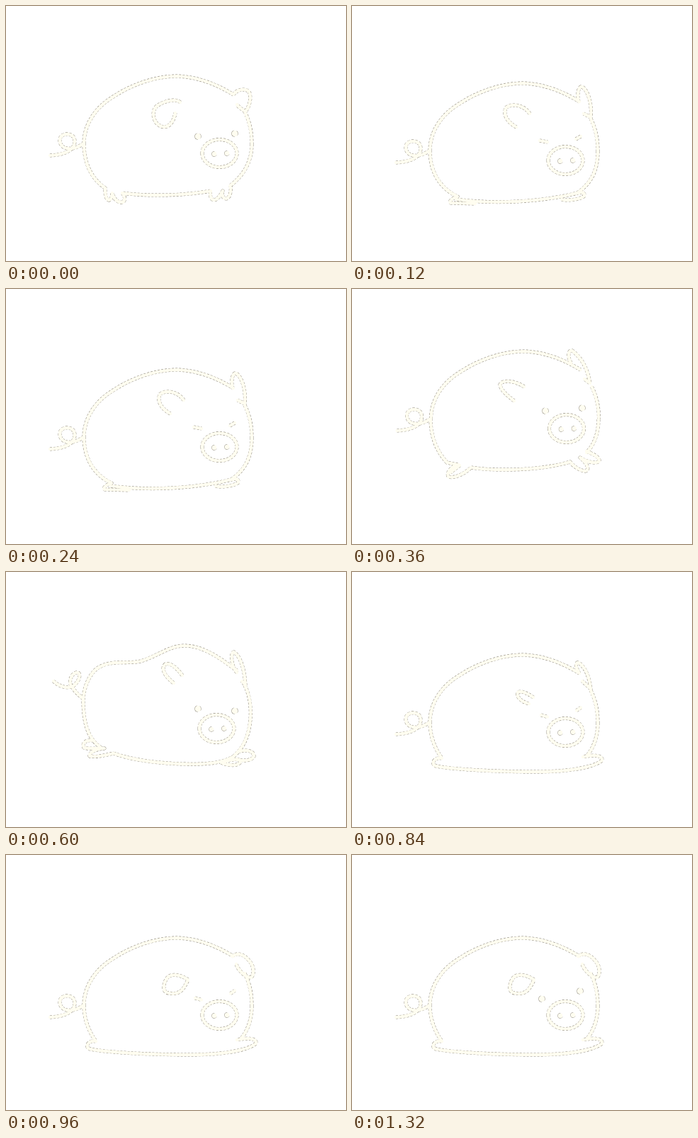
An HTML page with a canvas for the animation above (1.92 s loop, 480 by 360 pixels).

```html
<!DOCTYPE html>
<html>
<head>
<meta charset="utf-8">
<title>Hopping pig</title>
<style>
html, body { margin: 0; overflow: hidden; background: #fff; }
canvas { display: block; }
</style>
</head>
<body>
<canvas id="stage" width="480" height="360"></canvas>
<script>
const ctx = document.getElementById('stage').getContext('2d');
const LOOP = 1920;

const oval = (x, y, rx, ry = rx) =>
  `M${x - rx},${y}a${rx},${ry} 0 1 0 ${2 * rx},0a${rx},${ry} 0 1 0 ${-2 * rx},0`;
const eyes = (x1, y1, x2, y2) => oval(x1, y1, 2.2) + oval(x2, y2, 2.2);
const snout = (x, y) => oval(x, y, 24.5, 19.5) + oval(x - 7.5, y + 1, 1.2) + oval(x + 10.5, y, 1.2);

// Parts that move as one piece while the pig keeps its round back
const round = snout(301.5, 208) +
  'M62,211C84,210 97,203 97,191C97,178 78,178 76,188C75,202 92,206 108,195' +
  'M110,194C110,166 128,142 150,129C178,110 212,99 242,99C272,100 300,112 321,125' +
  'M337,149C345,165 347,180 347,195';

const squint = 'M265,190L276,192M316,188L323,184';
const sleepy = 'M267,202L276,204.500M317,195.500L323,191.500';

const crouch =
  'M110,204C110,230 121,256 149,269C139,272 136,278 140,278L174,279' +
  'M347,205C347,232 338,250 318,264' +
  'M148,273C200,280 270,277 322,263' +
  'M296,273C305,276 325,272 328,268C329,264 325,262 320,264' +
  'M320,135C317,125 320,112 325,114C334,120 339,140 337,157L327,152' +
  'M251,152C243,140 227,137 218,143C212,152 219,164 232,171' + squint;

const flat =
  'M110,212C110,230 116,248 127,263C118,261 112,268 116,273C130,278 200,282 260,282' +
  'C300,282 340,277 353,266C354,258 340,258 326,261M347,213C347,232 341,248 332,259';
const flopped = flat +
  'M319,143C328,137 336,140 344,150C351,158 350,170 346,173C338,173 328,163 325,154' +
  'M257,176C245,168 232,167 227,174C221,184 221,194 230,195C245,198 251,190 257,176';

const stand =
  'M110,194C110,218 118,242 140,257C140,264 140,272 145,274C149,274 150,267 150,264' +
  'M151,267C154,275 160,278 165,277C169,274 168,268 164,264C200,269 250,268 289,261' +
  'C287,268 290,274 294,274C299,273 303,267 306,261C304,266 306,272 311,272' +
  'C317,270 318,260 317,253M347,195C347,220 335,240 316,254' +
  'M321,125C327,117 338,116 343,121C347,128 344,142 338,149C333,146 328,142 326,139' +
  'M246,136C240,130 222,134 212,142C205,150 208,164 217,169C226,174 236,168 239,151' +
  eyes(271, 184, 323, 180);

const leap =
  'M111,183C111,205 117,226 134,245L150,248C140,250 133,260 136,265' +
  'C145,268 160,260 168,252C200,257 265,257 308,244C312,250 322,257 330,257' +
  'C336,255 332,246 322,238C333,245 345,247 349,243C350,237 340,233 331,229' +
  'M152,249L139,259M348,184C348,203 342,220 331,231' +
  'M309,104C304,95 305,86 311,87C325,98 333,114 336,133L328,127' +
  'M243,138C232,130 212,127 209,135C210,143 220,151 229,158' +
  eyes(273, 172, 325, 168);

const land = snout(297.5, 221) +
  'M67,154C75,162 87,165 95,161C106,152 106,140 99,142C90,145 88,158 94,163C98,170 103,174 108,178' +
  'M134,248C115,235 109,212 109,180C110,160 120,140 132,134C150,124 170,130 190,126' +
  'C212,120 230,104 252,104C280,104 305,124 326,139' +
  'M337,160C345,175 346,195 345,208C343,232 335,250 318,263' +
  'M152,256C190,270 250,272 275,271C300,270 312,266 322,260' +
  'M124,238C112,236 107,242 110,248C116,250 130,249 139,249C125,250 117,256 118,260C128,262 142,258 152,256' +
  'M304,269C312,273 328,275 331,268C330,263 318,264 308,268' +
  'M326,264C335,268 348,266 350,260C350,252 338,250 328,254' +
  'M326,142C317,132 317,112 322,113C332,120 337,140 338,160L333,154' +
  'M249,146C240,134 232,128 225,130C218,136 224,147 237,157' +
  eyes(271, 193, 323, 196);

const squash = flat +
  'M321,143C314,132 316,127 320,128C329,134 335,148 337,165L325,154' +
  'M256,177C248,171 238,167 234,170C232,176 238,183 250,186' + sleepy;

// [end time, details, their y shift, round back's x and y shift]
const poses = [
  [120, stand, 0, 0, 0],
  [240, crouch, 0, 0, 10],
  [360, crouch, 5, 0, 15],
  [600, leap, 0, 1.5, -11],
  [840, land, 0],
  [960, squash, 0, 0, 18],
  [1320, flopped + sleepy, 0, 0, 18],
  [LOOP, flopped + eyes(268, 203, 322, 192), 0, 0, 18]
].map(([end, details, y, bx, by]) => {
  const path = new Path2D();
  path.addPath(new Path2D(details), new DOMMatrix([1, 0, 0, 1, 0, y]));
  if (by !== undefined) path.addPath(new Path2D(round), new DOMMatrix([1, 0, 0, 1, bx, by]));
  return { end, path };
});

function line(path, color, width, dash) {
  ctx.strokeStyle = color;
  ctx.lineWidth = width;
  ctx.setLineDash(dash);
  ctx.stroke(path);
}

function draw(now) {
  const t = now % LOOP;
  const { path } = poses.find(p => t < p.end);
  ctx.clearRect(0, 0, 480, 360);
  ctx.lineJoin = 'round';
  ctx.lineCap = 'butt';
  line(path, '#8d887c', 5, [3, 2]);
  ctx.lineCap = 'round';
  line(path, '#fffdf0', 4.2, []);
  requestAnimationFrame(draw);
}
requestAnimationFrame(draw);
</script>
</body>
</html>
```
